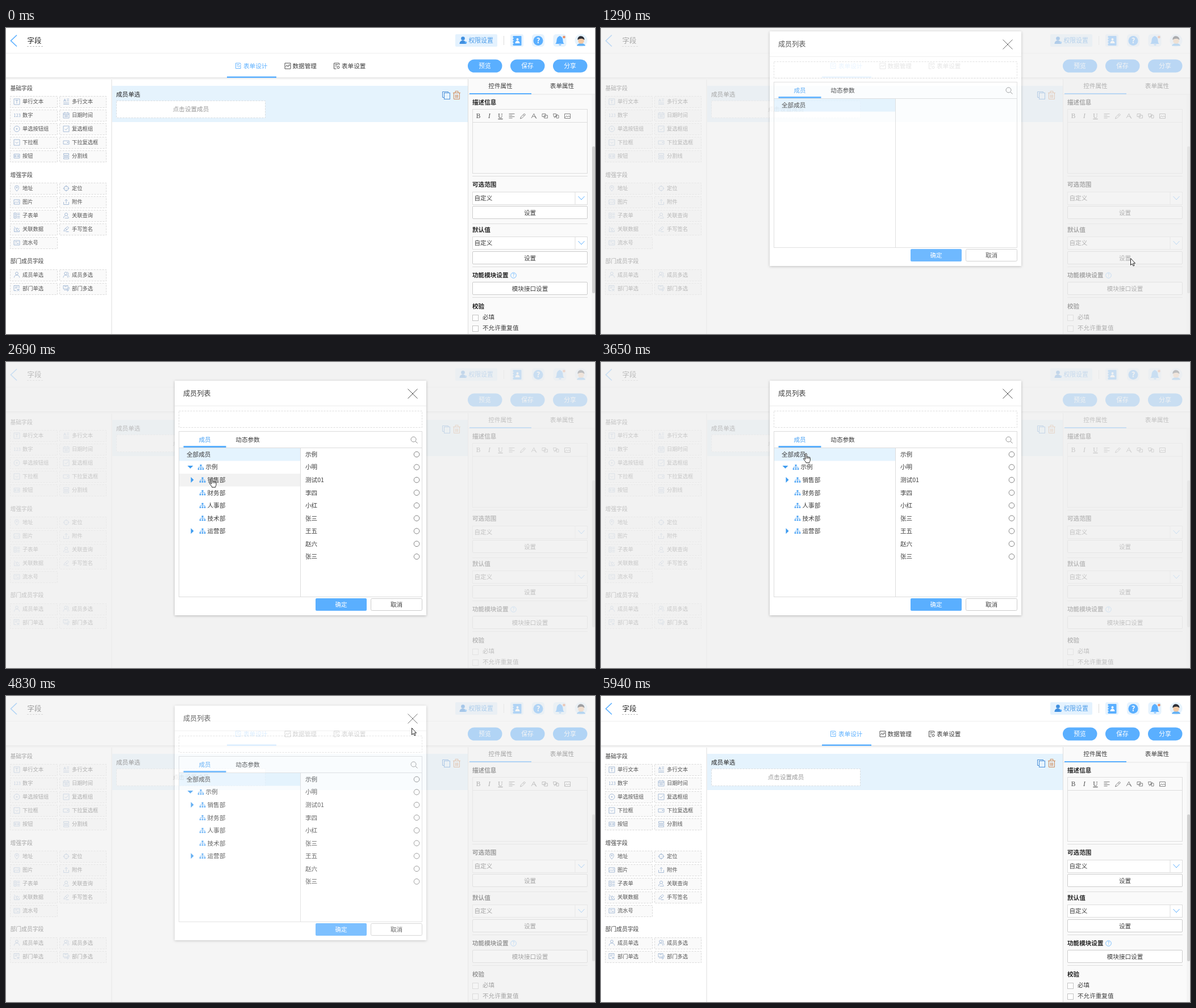
An HTML page that plays this animation: 1037x540 px, repeating every 6090 ms.

```html
<!DOCTYPE html>
<html lang="zh-CN">
<head>
<meta charset="utf-8">
<title>字段</title>
<style>
html, body { margin: 0; width: 100%; height: 100%; overflow: hidden; background: #fff; }
svg { display: block; width: 1037px; height: 540px; }
text { font-family: "Noto Sans CJK SC", "Noto Sans CJK", "Noto Sans", sans-serif; white-space: pre; }
</style>
</head>
<body>
<svg id="stage" viewBox="0 0 1037 540"></svg>
<script>
const BLUE = '#5aafff', INK = '#3c3c3c', LOOP = 6090;

const rect = (x, y, w, h, fill, extra = '') =>
  `<rect x="${x}" y="${y}" width="${w}" height="${h}" fill="${fill}" ${extra}/>`;
const box = (x, y, w, h, fill, stroke, extra = '') =>
  rect(x + .5, y + .5, w - 1, h - 1, fill, `stroke="${stroke}" ${extra}`);
const path = (d, stroke, extra = '') =>
  `<path d="${d}" fill="none" stroke="${stroke}" ${extra}/>`;
const shape = (d, fill) => `<path d="${d}" fill="${fill}"/>`;
const disc = (x, y, r, fill, extra = '') =>
  `<circle cx="${x}" cy="${y}" r="${r}" fill="${fill}" ${extra}/>`;
const at = (x, y, content) => `<g transform="translate(${x} ${y})">${content}</g>`;
// y is the vertical middle of the line
const label = (x, y, str, size = 10.6, fill = INK, extra = '') =>
  `<text x="${x}" y="${y + size * .37}" font-size="${size}" fill="${fill}" ${extra}>${str}</text>`;
const centered = (x, y, str, size, fill, extra = '') =>
  label(x, y, str, size, fill, 'text-anchor="middle" ' + extra);
const DASH = 'stroke-dasharray="3 2"';
const MEDIUM = 'font-weight="500"', BOLD = 'font-weight="700"';

// Line icons on an 11 by 11 grid
const FRAME = 'M.5 1.5h10v8h-10z';
const ICONS = {
  text: 'M.5 .5h10v10h-10zM3 3h5M5.5 3v5.5',
  lines: 'M.5 10h10M.5 7.5h10M1 5.5l2-5 2 5M6.5 1h4M6.5 4h4M2 4h2',
  calendar: 'M.5 1.5h10v9h-10zM.5 4h10M3 0v2M8 0v2M2.5 6h6M2.5 8h6',
  radio: 'M.5 5.5a5 5 0 1 0 10 0a5 5 0 1 0-10 0M4.5 5.5a1 1 0 1 0 2 0a1 1 0 1 0-2 0',
  check: 'M.5 .5h10v10h-10zM3 5.5l2 2 4-4.5',
  drop: 'M.5 .5h10v10h-10zM3 4.5l2.5 2.5 2.5-2.5',
  multiDrop: 'M.5 2.5h10v6h-10zM7 5h2l-1 1.2z',
  button: 'M.5 2h10v7h-10zM2 4.5h2v2h-2zM5 5.5h1M7 4.5h2v2h-2z',
  divider: 'M1 1h9v3h-9zM0 6h11M1 8h9v2.5h-9z',
  pin: 'M5.5 10.5C2 6.5 2 5 2 4a3.5 3.5 0 0 1 7 0c0 1 0 2.5-3.5 6.5zM4.5 4a1 1 0 1 0 2 0a1 1 0 1 0-2 0',
  target: 'M1.5 5.5a4 4 0 1 0 8 0a4 4 0 1 0-8 0M5.5 0v3M5.5 8v3M0 5.5h3M8 5.5h3M5 5.5h1',
  image: FRAME + 'M1 8l3-3 2 2 2-2 2 2M7.5 3.5h1',
  upload: 'M1 5.5v4.5h9v-4.5M5.5 8v-7M3 3.5l2.5-2.5 2.5 2.5',
  subform: 'M.5 1h4v9h-4zM6 1.5h5M6 4h5M6 7h5M6 9.5h5M1.5 4h2M1.5 7h2',
  search: 'M3 3.5a2.5 2.5 0 1 0 5 0a2.5 2.5 0 1 0-5 0M1 10v-2l3-2M7 6l3 3M3 10h7',
  data: 'M1 1l3 4M1 4v6h9v-3M4 8l2-5 2 3 2-2M5 8h3',
  sign: 'M1 9l2-4 5-4 2 2-5 5-3 1M5 10h5M4 4l3 3',
  serial: FRAME + 'M2.5 4h4M8 4h1M2.5 7h1M5 7h4',
  person: 'M3.2 3.2a2.3 2.5 0 1 0 4.6 0a2.3 2.5 0 1 0-4.6 0M.8 10.5c0-6 9.4-6 9.4 0',
  people: 'M2.2 3.2a2.3 2.5 0 1 0 4.6 0a2.3 2.5 0 1 0-4.6 0M.4 10.5c0-6 8-6 8 0M7 1c3 0 3 4 1 4.5 2 .5 2.5 3 2.5 4',
  dept: 'M9.5 5v-4.5h-9v9h4M2.5 3h5M2.5 5h3M6 7h4l-2 2zM6 10.5l2-2 2 2',
  depts: 'M.5 .5h8v6h-8zM2 8.5h3M2.5 2.5h4M10.5 3v4M6 8h4l-2 2.5z',
};
const icon = (name, x, y, color = '#9db5d3') =>
  at(x, y, path(ICONS[name], color, 'stroke-width=".9"'));

const GROUPS = [
  ['基础字段', 106, 130, ['text:单行文本', 'lines:多行文本', '123:数字', 'calendar:日期时间',
    'radio:单选按钮组', 'check:复选框组', 'drop:下拉框', 'multiDrop:下拉复选框', 'button:按钮', 'divider:分割线']],
  ['增强字段', 259, 283, ['pin:地址', 'target:定位', 'image:图片', 'upload:附件', 'subform:子表单',
    'search:关联查询', 'data:关联数据', 'sign:手写签名', 'serial:流水号']],
  ['部门成员字段', 411.5, 435.5, ['person:成员单选', 'people:成员多选', 'dept:部门单选', 'depts:部门多选']],
];

function sidebar() {
  return GROUPS.map(([title, titleY, top, items]) =>
    label(7.5, titleY, title, 9.8, INK) + items.map((item, i) => {
      const [kind, name] = item.split(':');
      const x = i % 2 ? 94 : 7, y = top + 24 * (i >> 1);
      const mark = ICONS[kind] ? icon(kind, x + 6.5, y - 5.5)
        : label(x + 6.5, y, kind, 7, '#8fa9cb', 'letter-spacing=".4"');
      return box(x, Math.round(y) - 10, i % 2 ? 83 : 84, 21, '#fafafa', '#d9d9d9', DASH) +
        mark + label(x + 22, y, name, 9.25, '#555');
    }).join('')).join('') + rect(185.5, 90, 1, 450, '#dedede');
}

function header() {
  const tabs = [['表单设计', 404, BLUE], ['数据管理', 490.5, INK], ['表单设置', 577, INK]];
  const tabIcon = [
    'M9 5v5h-8.5v-9.5h8v2M2.5 3h4M2.5 5.5h3M5 8l5-5',
    'M.5 .5h10v10h-10zM2 7l2-3 2 3 2-4 1 2',
    'M9.5 4v-3.5h-9v10h4M2.5 3h5M2.5 5.5h3M6 8a2 2 0 1 0 4 0a2 2 0 1 0-4 0',
  ];
  return path('M19 12.5L8.5 22.5 19 32.5', BLUE, 'stroke-width="1.6"') +
    label(37.5, 22, '字段', 12.4, '#222') +
    path('M37 32.5h29', '#bbb', DASH) +
    rect(791, 11, 74, 22, '#e4f2fe', 'rx="2"') +
    disc(804.5, 18.5, 3.3, '#3f8fe0') +
    shape('M798.5 28c0-8 11-8 12 0z', '#3f8fe0') + disc(809.5, 25.5, 1.8, BLUE) +
    label(814.5, 22, '权限设置', 10.8, '#4b9be8') +
    rect(876, 14, 1, 16, '#ddd') +
    rect(888, 11, 23, 22, '#e6f3fe', 'rx="3"') +
    rect(892.5, 14, 15, 17, BLUE, 'rx="1"') + disc(900.5, 20, 2, '#fff') +
    shape('M896.5 27c0-6 8-6 8 0z', '#fff') + path('M891 18h3M891 22.5h3M891 27h3', '#fff') +
    rect(926, 11, 22, 22, '#e6f3fe', 'rx="5"') + disc(937, 22.5, 8.5, BLUE) +
    centered(937, 22.5, '?', 13, '#fff', BOLD) +
    rect(963.5, 11, 23, 22, '#e6f3fe', 'rx="5"') +
    shape('M967 28c3-2 2-6 3-9 1-3 3-4 5-5 2 1 4 2 5 5 1 3 0 7 3 9zM973 29h5q-2.5 3-5 0z', BLUE) +
    disc(982.5, 16, 2.3, '#e8906a') +
    disc(1012.5, 22, 11, '#e6f3fe') +
    shape('M1005 31.5c1-6 14-6 15 0z', '#62b1f5') +
    disc(1012.5, 22.5, 5.3, '#f3c9a4') +
    shape('M1006.5 21c-1-9 12-9 12 0-4-3-8-3-12 0z', '#2d3038') +
    rect(0, 44, 1037, 1, '#efefef') +
    tabs.map(([name, x, color], i) =>
      at(x, 61.5, path(tabIcon[i], color, 'stroke-width=".9"')) +
      label(x + 14, 67, name, 10.6, color, i ? MEDIUM : '')).join('') +
    rect(0, 87, 1037, 2, '#e9e9e9') + rect(0, 89, 1037, 2, '#f6f6f6') +
    rect(389, 85.5, 87, 2.5, BLUE) +
    [['预览', 813], ['保存', 888], ['分享', 963]].map(([name, x]) =>
      rect(x, 55.5, 60.5, 23, BLUE, 'rx="11.5"') + centered(x + 30, 67.2, name, 10.8, '#fff', MEDIUM)).join('');
}

function canvasArea() {
  return rect(187, 102, 627, 64, '#e5f3fd') +
    label(194, 117.5, '成员单选', 10.6, '#222', MEDIUM) +
    box(194, 128, 263, 31, '#fff', '#d9dde0', DASH) +
    centered(325.5, 143.5, '点击设置成员', 10.6, '#999') +
    path('M768.5 112.5h10v10h-10z', '#4b8fd8') +
    rect(771.5, 114.5, 10, 11, '#e5f3fd', 'stroke="#4b8fd8"') +
    path('M787 114.5h13M791 114v-2.5h5v2.5M788.5 115v10.5h10v-10.5M791.5 117.5v6M793.5 117.5v6M795.5 117.5v6', '#d08a58');
}

const SETTING_BUTTONS = [[314, '设置'], [394, '设置'], [448, '模块接口设置']];

function select(y) {
  return box(821, y, 203, 23, '#fff', '#ddd') + rect(1001.5, y, 1, 23, '#ddd') +
    label(824.5, y + 11.5, '自定义', 10.6) +
    path(`M1007.5 ${y + 8}l5.5 6 5.5-6`, BLUE);
}

function editorTools() {
  const serif = (x, s, style) =>
    `<text x="${x}" y="159" font-size="11.5" fill="#555" text-anchor="middle" style="font-family:'Liberation Serif',serif;${style}">${s}</text>`;
  const marks = [
    [885, 'M.5 1.5h10M.5 4h6M.5 6.5h10M.5 9h6'],
    [904.5, 'M1 10l1-3 6-6 2 2-6 6zM6 3l2 2'],
    [924, 'M1 9l4.5-8 3 8M3 6h5M8 6l2 4'],
    [943.5, 'M.5 1.5h6v5h-6zM4 4h6v5h-6z'],
    [963, 'M.5 1.5h5l1 5h-5zM5 4h5v5h-4zM2 9l6-7'],
    [983, FRAME + 'M1 8l3-3 2 2 2-2 2 2'],
  ];
  return serif(831.5, 'B', '') + serif(851, 'I', 'font-style:italic') +
    serif(870.5, 'U', 'text-decoration:underline') +
    marks.map(([x, d]) => at(x, 150, path(d, '#777', 'stroke-width=".9"'))).join('');
}

function settings() {
  const heading = (y, s) => label(821, y, s, 10.6, '#222', BOLD);
  return rect(814, 90, 223, 450, '#fafafa') + rect(813, 90, 1, 450, '#dedede') +
    rect(814, 116.5, 223, 1, '#e6e6e6') + rect(816, 115, 109, 2, BLUE) +
    centered(870.5, 102.5, '控件属性', 10.6, INK) + centered(979, 102.5, '表单属性', 10.6, INK) +
    heading(131.5, '描述信息') + box(821, 143, 203, 114, '#fafafa', '#ddd') +
    rect(821, 166, 203, 1, '#ddd') + editorTools() +
    [261, 345, 421, 475].map(y => rect(821, y, 203, 1, '#ddd')).join('') +
    heading(276.5, '可选范围') + select(289) + heading(356.5, '默认值') + select(368) +
    heading(436.5, '功能模块设置') + disc(893.5, 436.5, 4.8, 'none', `stroke="${BLUE}" stroke-width=".8"`) +
    centered(893.5, 436.5, '?', 7.5, BLUE) +
    SETTING_BUTTONS.map(([y, name], i) =>
      box(821, y, 203, 23, '#fff', '#ccc', `rx="1.5" id="setting${i}"`) +
      centered(922.5, y + 12, name, 10.6, INK)).join('') +
    heading(491.5, '校验') +
    [['必填', 510.5], ['不允许重复值', 529.5]].map(([s, y]) =>
      box(821, Math.round(y) - 5, 11, 11, '#fff', '#c4c4c4') + label(839, y - .5, s, 10.6)).join('') +
    rect(1031, 118, 6, 422, '#f4f4f4') + rect(1032, 209, 5, 259, '#d0d0d0', 'rx="2"');
}

const ROW = 22.55, rowY = i => 163 + ROW * i;
const TREE = ['全部成员', '示例', '销售部', '财务部', '人事部', '技术部', '运营部'];
const MEMBERS = ['示例', '小明', '测试01', '李四', '小红', '张三', '王五', '赵六', '张三'];

function treeRow(name, i) {
  const y = rowY(i);
  if (!i) return '';
  const x = i > 1 ? 340.5 : 337.5;
  const arrow = i === 1 ? shape(`M319.5 ${y - 2.5}h10l-5 5z`, '#3d9bf0')
    : i === 2 || i === 6 ? shape(`M325.5 ${y - 5}v10l5-5z`, '#3d9bf0') : '';
  return arrow + at(x, y - 4.5,
    path('M5.5 2v3M1.5 7v-2.5h8v2.5M5.5 4v3', '#5aaaf5', 'stroke-width=".8"') +
    shape('M4 0h3v2.8h-3zM.2 6.5h2.6v2.6h-2.6zM4.2 6.5h2.6v2.6h-2.6zM8.2 6.5h2.6v2.6h-2.6z', '#4ba3f5')) +
    label(x + 14, y, name);
}

function dialog() {
  return `<g id="overlay">${rect(0, 0, 1037, 540, '#eee', 'opacity=".75"')}<g id="dialog">` +
    rect(297, 33, 443, 414, '#fff', 'style="filter:drop-shadow(0 1px 2px rgba(0,0,0,.25))"') +
    label(312, 56, '成员列表', 12.1) + rect(297, 77, 443, 1, '#ececec') +
    path('M707.5 47.5l17 17M724.5 47.5l-17 17', '#555') +
    box(304, 86, 429, 30, '#fff', '#ddd', DASH) +
    box(304, 122, 429, 293, '#fff', '#dcdcdc') +
    rect(304, 151, 429, 1, '#dcdcdc') + rect(312.5, 148, 75, 3, BLUE) +
    centered(350, 137, '成员', 10.6, '#4ba3f5') + centered(425.5, 137, '动态参数', 10.6, INK) +
    disc(717.5, 136.5, 4.5, 'none', 'stroke="#888" stroke-width=".9"') + path('M721 140l3.5 3.5', '#888') +
    rect(305, 152, 213.5, 22.5, '#e4f3fe') + rect(0, 0, 0, 22.5, '#f2f2f2', 'id="hover"') +
    rect(518, 152, 1, 262, '#dcdcdc') + label(318, rowY(0), TREE[0]) +
    '<g id="loaded">' + TREE.map(treeRow).join('') +
    MEMBERS.map((name, i) => label(527, rowY(i), name) +
      disc(723, rowY(i), 4.8, '#fff', 'stroke="#777" stroke-width=".9"')).join('') + '</g>' +
    rect(545, 417, 90, 22, BLUE, 'rx="2"') + centered(590, 428.5, '确定', 10.6, '#fff', MEDIUM) +
    box(642, 417, 91, 22, '#fff', '#ccc', 'rx="2"') + centered(687.5, 428.5, '取消', 10.6, INK) +
    '</g></g>';
}

const POINTER = '<g stroke="#222" fill="#fff" stroke-linejoin="round">' +
  '<path id="arrow" d="M.5 .5v12l2.7-2.5 2 4 1.8-.9-1.9-3.9h3.4z"/>' +
  '<path id="hand" d="M-1.3 11V1.5c0-1.7 2.5-1.7 2.5 0v5c.3-1 2.1-.9 2.2.4.4-.9 2-.7 2.1.5.6-.7 1.8-.4 1.8.8v4c0 2-1.3 2.5-1.3 4.6h-6c0-2-3-4-4.4-6.8-.6-1.6 1.2-2.2 3.1 1zM1.2 6.5v3M3.4 7v2.5M5.5 7.5v2"/></g>';

const stage = document.getElementById('stage');
stage.innerHTML = rect(0, 0, 1037, 540, '#fff') + sidebar() + header() + canvasArea() + settings() +
  dialog() + `<g id="pointer">${POINTER}</g>`;
const $ = id => document.getElementById(id);
const show = (el, on) => el.setAttribute('visibility', on ? 'visible' : 'hidden');
const clamp = v => Math.min(1, Math.max(0, v));

// Stretches of motion: start, end, number of intervals; the picture rests in between
const RUNS = [[230, 790, 7], [1030, 1290, 3], [1360, 1510, 2], [1750, 1910, 2], [1980, 2300, 4], [2380, 3010, 8],
  [3650, 4210, 7], [4290, 4370, 1], [4520, 4600, 1], [4750, 5460, 9]];

function hold(t) {
  const run = RUNS.findLast(r => r[0] <= t);
  if (!run) return 0;
  const [start, end, n] = run, gap = (end - start) / n;
  return start + Math.min(n, Math.floor((t - start) / gap + 1e-6)) * gap;
}

const TRACK = [[230, 1013, 532], [790, 932, 406], [1670, 932, 406], [1980, 399, 203], [2300, 364, 226],
  [2380, 364, 222], [3010, 360, 166], [3570, 360, 164], [3650, 361, 161], [4210, 702, 72],
  [4370, 714, 56], [4830, 714, 56], [5460, 1017, 541]];

function pointerAt(t) {
  const i = Math.max(1, TRACK.findIndex(k => k[0] >= t));
  const [t0, x0, y0] = TRACK[i - 1], [t1, x1, y1] = TRACK[i];
  const u = clamp((t - t0) / (t1 - t0)), e = u * u * (3 - 2 * u);
  return [x0 + (x1 - x0) * e, y0 + (y1 - y0) * e];
}

const CLOSE = 4801, OPEN = 1125;
function dialogAt(t) {
  const closing = t >= CLOSE, s = t - (closing ? CLOSE : OPEN);
  const fade = clamp(s / (closing ? 130 : 190));
  const move = 1 - (1 - clamp(s / 300)) ** 1.7;
  return closing ? [1 - fade, Math.round(-103 * move)] : [fade, Math.round(-103 * (1 - move))];
}

function render(time) {
  const t = hold(time);
  const [alpha, shift] = dialogAt(t);
  const [x, y] = pointerAt(t);
  const loaded = t >= 1509, open = alpha > 0, settled = alpha === 1 && !shift;

  $('overlay').setAttribute('opacity', alpha);
  show($('overlay'), open);
  $('dialog').setAttribute('transform', `translate(0 ${shift})`);
  $('loaded').setAttribute('opacity', loaded ? 1 : 0);

  let hand = false;
  SETTING_BUTTONS.forEach(([top], i) => {
    const over = t >= 230 && !open && x > 821 && x < 1024 && y >= top && y <= top + 23;
    hand ||= over;
    $('setting' + i).setAttribute('fill', over ? '#e9e9e9' : '#fff');
  });

  const row = Math.floor((y - 152) / ROW), inTree = x < 518;
  const overRow = settled && loaded && x > 305 && x < 732 && row >= 0 &&
    row < (inTree ? TREE : MEMBERS).length;
  const tinted = overRow && !(inTree && row === 0);
  const hover = $('hover');
  hover.setAttribute('x', inTree ? 305 : 519);
  hover.setAttribute('width', tinted ? 213 : 0);
  hover.setAttribute('y', 152 + row * ROW);
  hand ||= overRow || settled && Math.abs(x - 715) < 10 && Math.abs(y - 56) < 10;

  const visible = t >= 230 && t < 5460;
  show($('arrow'), visible && !hand);
  show($('hand'), visible && hand);
  $('pointer').setAttribute('transform', `translate(${x.toFixed(1)} ${y.toFixed(1)})`);
}

const began = performance.now();
function tick() {
  render((performance.now() - began) % LOOP);
  requestAnimationFrame(tick);
}
tick();
</script>
</body>
</html>
```
